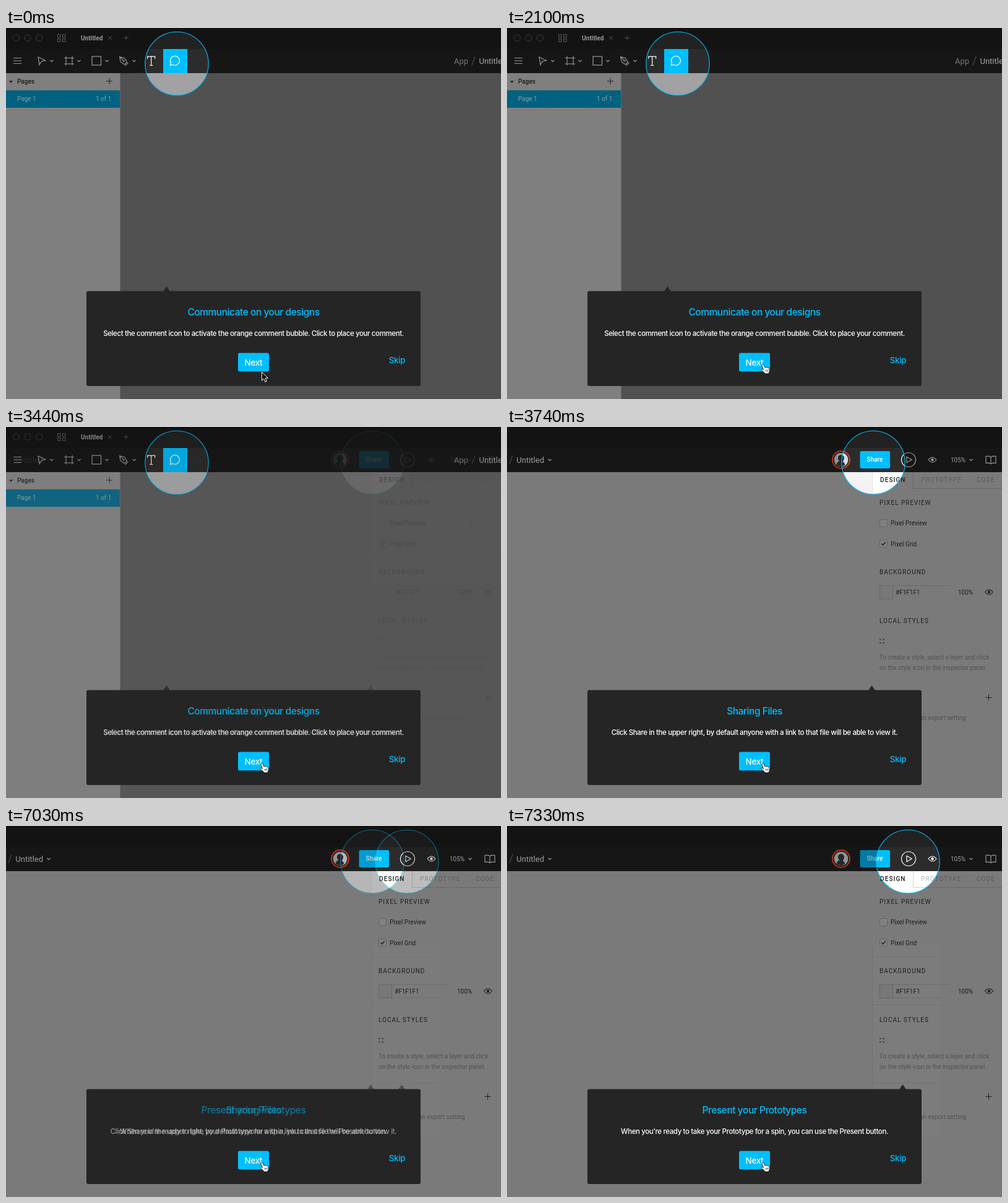
Animation, 800 px wide and 600 px high, one loop 8 s. Source, as an HTML page:

```html
<!DOCTYPE html>
<html lang="en">
<head>
<meta charset="utf-8">
<title>Onboarding tour</title>
<style>
html, body { margin: 0; width: 100%; height: 100%; overflow: hidden; background: #252525; }
svg { display: block; width: 800px; height: 600px; }
text { font: 10px Roboto, sans-serif; white-space: pre; }
.file { font-size: 13px; }
.head { letter-spacing: 1px; }
.tab { letter-spacing: 1.1px; }
.bold { font-weight: 700; }
.mid { font-weight: 500; }
.title, .body, .btn { font: 500 15.5px Inter, sans-serif; letter-spacing: -.46px; text-anchor: middle; }
.body { font-size: 11.5px; letter-spacing: -.39px; }
.btn { font-size: 13.4px; letter-spacing: -.3px; }
</style>
</head>
<body>
<svg id="stage" viewBox="0 0 800 600"></svg>
<script>
const CYAN = '#00bfff', DIALOG = '#252525';

const rect = (x, y, w, h, fill, more = '') =>
  `<rect x="${x}" y="${y}" width="${w}" height="${h}" fill="${fill}" ${more}/>`;
const line = (d, color, width = 1) =>
  `<path d="${d}" fill="none" stroke="${color}" stroke-width="${width}"/>`;
const shape = (d, fill, more = '') => `<path d="${d}" fill="${fill}" ${more}/>`;
const ring = (x, y, r, color, width = 1, fill = 'none') =>
  `<circle cx="${x}" cy="${y}" r="${r}" fill="${fill}" stroke="${color}" stroke-width="${width}"/>`;
const label = (x, y, str, fill, cls = '', more = '') =>
  `<text x="${x}" y="${y}" fill="${fill}" class="${cls}" ${more}>${str}</text>`;
const group = (id, inner) => `<g id="${id}">${inner}</g>`;

const chevron = (x, color) => line(`M${x - 2.6} 51.8l2.6 2.6 2.6-2.6`, color, 1.2);
const plus = (x, y, r, color) => line(`M${x - r} ${y}h${2 * r}M${x} ${y - r}v${2 * r}`, color);
const slash = (x, color) => line(`M${x} 60l5-14`, color);
const eye = (x, y, color) =>
  line(`M${x - 6.5} ${y}q6.5-8 13 0q-6.5 8-13 0z`, color, 1.1) + ring(x, y, 1.8, color, 1, color);
const checkbox = y => rect(602.5, y, 12, 12, '#808080', 'rx="2" stroke="#636363"');
const pointer = x => shape(`M${x - 5.5} 426l5.5-8 5.5 8z`, DIALOG);

const header = lit =>
  rect(0, 0, 800, 34, lit ? '#222' : '#131313') +
  rect(0, 34, 800, 39, lit ? '#2c2c2c' : '#161616') +
  rect(0, 0, 800, 1, '#080808');

// Circle of light over a dimmed screen
const spotlight = (id, x, dim, lit) => `
  <clipPath id="${id}Spot"><circle cx="${x}" cy="57.5" r="51.3"/></clipPath>
  ${dim}<g clip-path="url(#${id}Spot)">${lit}</g>${ring(x, 57.5, 51.2, CYAN, 1.1)}`;

function editorLeft() {
  const ink = '#999', faint = '#4d4d4d';
  const dim = header(false) +
    rect(0, 73, 800, 527, '#515151') +
    rect(0, 73, 184.5, 527, '#7f7f7f') +
    line('M0 100.5h184', '#747474') +
    [16.5, 35, 53.5].map(x => ring(x, 16, 5.2, '#3a3a3a')).join('') +
    [83.5, 91.5].map(x => [10.5, 17.5].map(y =>
      rect(x, y, 4.5, 4.5, 'none', 'stroke="#5c5c5c"')).join('')).join('') +
    label(121, 20, 'Untitled', ink, 'bold') +
    line('M165 13l6 6m0-6l-6 6', faint) + plus(194, 16, 4, faint) +
    line('M12 48.5h13M12 53h13M12 57.5h13', ink, 1.2) +
    line('M52 47L63.5 52.5 57.5 54 54 59.5z', ink, 1.2) +
    line('M97 45.5v15M107 45.5v15M94 48.5h16M94 58h16', ink, 1.1) +
    rect(139, 46, 14.5, 14, 'none', `stroke="${ink}" stroke-width="1.2"`) +
    line('M183.5 46.5l8 2.2 4 6.3-4 4-6.3-4zM184 47l5.5 5.5M197.5 56l-5 5', ink, 1.1) +
    ring(190.3, 53.2, 1.4, ink) +
    [74, 118, 163, 207].map(x => chevron(x, ink)).join('') +
    label(724, 57.5, 'App', '#777', 'file') + slash(753, '#555') +
    label(764.5, 57.5, 'Untitled', '#a8a8a8', 'file') +
    shape('M5 85.5h6l-3 3.5z', '#1a1a1a') +
    label(18, 90, 'Pages', '#1a1a1a', 'mid') + plus(167, 86, 5, '#222') +
    rect(0, 101, 184, 28, '#006180') +
    label(18, 118, 'Page 1', '#8a9ca3') + label(145, 118, '1 of 1', '#8a9ca3');
  const lit = header(true) +
    rect(220, 73, 120, 40, '#a2a2a2') +
    line('M228.7 49.8v-3.6h12v3.6M234.7 46v14.6M232 60.5h5.5', '#fff', 1.2) +
    rect(254, 34, 39, 39, CYAN) +
    line('M265.3 60.5l1.2-4.2a7.4 7.4 0 1 1 3 3z', '#fff', 1.2);
  return spotlight('a', 276, dim, lit) + pointer(259.5);
}

function editorRight(lit) {
  const pick = (off, on) => lit ? on : off;
  const ink = pick('#9c9c9c', '#fff'), dark = '#1e1e1e', soft = pick('#5a5a5a', '#b3b3b3');
  const help = '#525252', edge = '#6c6c6c', box = `stroke="${edge}"`;
  const panel = lit
    ? rect(590, 73, 210, 527, '#fff') + line('M590.5 73v527', '#e2e2e2')
    : `<g class="lines">${rect(590, 73, 210, 527, '#7c7c7c') +
      line('M590.5 73v527M591 211.5h209M591 289.5h209M591 415.5h209', '#727272') +
      rect(752, 145, 37.5, 21, 'none', box) + label(758, 159, '1x', '#686868') +
      line('M779 154.5l2.5 2.5 2.5-2.5', '#686868') +
      rect(602.5, 256.5, 115, 21.5, 'none', box) +
      rect(723.5, 256.5, 38.5, 21.5, 'none', box)}</g>`;
  return header(lit) +
    rect(0, 73, 800, 527, pick('#7a7a7a', '#f3f3f3')) + panel +
    line('M656.5 73v26.5H800', pick('#686868', '#d2d2d2')) +
    slash(4, '#555') + label(15.3, 57.5, 'Untitled', ink, 'file') + chevron(69, ink) +
    ring(540, 53, 14, pick('#b5331b', '#d63c1f'), 2) +
    ring(540, 53, 11.3, 'none', 0, pick('#909496', '#d5dde2')) +
    shape('M532.5 61.2q.5-5 5-5.7-3.2-3-2.5-7 1.5-3.5 5.5-3.5 4.5 1 4.5 5.5-.5 4-2.5 5.5 3.5 1.5 3.5 5.5-6 5-13.5-.3z', '#25282a') +
    rect(570.5, 39, 48.5, 28, pick('#007ba4', CYAN), 'rx="2"') +
    label(594.5, 56, 'Share', pick('#9cb4bd', '#fff'), 'mid', 'text-anchor="middle"') +
    ring(649, 53, 11.5, ink, 1.2) + line('M646 48.2v9.6l8.2-4.8z', ink, 1.2) +
    eye(687.5, 53, ink) +
    label(717, 56.7, '105%', ink) + chevron(750, ink) +
    line('M782 48.5q-4-2-8-1v11q4-1 8 1q4-2 8-1v-11q-4-1-8 1v11', ink, 1.1) +
    label(603, 89, 'DESIGN', dark, 'tab mid') +
    label(669, 89, 'PROTOTYPE', soft, 'tab') + label(759, 89, 'CODE', soft, 'tab') +
    label(602, 126, 'PIXEL PREVIEW', dark, 'head') +
    checkbox(149.5) + label(620, 159, 'Pixel Preview', dark) +
    checkbox(182.5) + label(620, 192.5, 'Pixel Grid', dark) +
    line('M605.5 188.5l2.2 2.4 4-4.6', dark, 1.5) +
    label(602, 238, 'BACKGROUND', dark, 'head') +
    rect(602.5, 256.5, 21, 21.5, '#787878', 'stroke="#666"') + line('M624 256.5h92', edge) +
    label(628, 271, '#F1F1F1', dark) + label(729, 271, '100%', dark) + eye(779, 267, dark) +
    label(602, 316.5, 'LOCAL STYLES', dark, 'head') +
    [602, 607.5].map(x => [342.5, 348].map(y => rect(x, y, 2.4, 2.4, '#444')).join('')).join('') +
    label(602, 376, 'To create a style, select a layer and click', help) +
    label(602, 392.5, 'on the style icon in the inspector panel.', help) +
    plus(778.5, 437.5, 5, dark) +
    label(742, 474, 'an export setting', help, '', 'text-anchor="end"');
}

const shareTour = (id, x, tip) =>
  spotlight(id, x, editorRight(false), editorRight(true)) + pointer(tip);

const message = (id, title, body) =>
  group(id, label(400, 464.5, title, CYAN, 'title') + label(400, 497.5, body, '#fff', 'body'));

const stage = document.getElementById('stage');
stage.innerHTML =
  group('share', shareTour('b', 592, 589.5)) +
  group('present', shareTour('c', 648, 639.5)) +
  group('comment', editorLeft()) +
  rect(130, 425.5, 540, 153.5, DIALOG, 'rx="3"') +
  message('commentText', 'Communicate on your designs',
    'Select the comment icon to activate the orange comment bubble. Click to place your comment.') +
  message('shareText', 'Sharing Files',
    'Click Share in the upper right, by default anyone with a link to that file will be able to view it.') +
  message('presentText', 'Present your Prototypes',
    "When you're ready to take your Prototype for a spin, you can use the Present button.") +
  rect(375, 525.5, 50, 30, CYAN, 'rx="2.5"') +
  label(400, 545.5, 'Next', '#fff', 'btn') + label(632, 541.8, 'Skip', CYAN, 'btn') +
  group('arrow', shape('M.5.5V14l3.2-3 2.2 5.3 2.3-1-2.2-5.2h4.3z', '#000', 'stroke="#fff"')) +
  group('hand',
    shape('M3 1.5Q4.5.2 5.6 1.8L7.4 6.2Q8.6 5 9.6 6.2 11 5.2 12 6.6 13.6 6 14.3 7.8L15 11Q15 13.2 13.6 14.6V16H7.6Q6 13.5 2.4 11 .6 9 2.4 8.4 3.6 8.4 5 9.8L2.6 3.4Q2.4 2.2 3 1.5z',
      '#fff', 'stroke="#000" stroke-width=".8"') +
    line('M8.5 10l.8 3M10.5 9.7l.7 3M12.4 9.3l.5 3', '#222', .8)) +
  '<clipPath id="strip"><rect x="590" y="190" width="110" height="310"/></clipPath>';

const el = id => document.getElementById(id);
const shareLines = document.querySelector('#share .lines');
document.querySelector('#present .lines').setAttribute('clip-path', 'url(#strip)');

// Each track is a list of [start time, held value]
const tracks = {
  arrowY: [[0, 556], [600, 551], [750, 548], [900, 546], [1800, 545]],
  handY: [[0, 545], [2100, 543]],
  hand: [[0, 0], [1950, .6], [2100, 1]],
  comment: [[0, 1], [3440, .86], [3590, .25], [3740, 0]],
  present: [[0, 0], [7030, .5], [7180, .93], [7330, 1]],
  lines: [[0, 1], [3740, 0]]
};
const at = (name, t) => tracks[name].filter(([start]) => start <= t).pop()[1];
const fade = (node, value) => node.setAttribute('opacity', value);
const move = (id, x, y) => el(id).setAttribute('transform', `translate(${x} ${y})`);

const begin = performance.now();
function draw(now) {
  const t = Math.max(0, now - begin) % 8000;
  const comment = at('comment', t), present = at('present', t), hand = at('hand', t);
  fade(el('comment'), comment);
  fade(el('commentText'), comment);
  fade(el('present'), present);
  fade(el('presentText'), present);
  fade(el('shareText'), (1 - comment) * (1 - present));
  fade(shareLines, at('lines', t));
  fade(el('arrow'), 1 - hand);
  fade(el('hand'), hand);
  move('arrow', 413, at('arrowY', t));
  move('hand', 409.5, at('handY', t));
  requestAnimationFrame(draw);
}
draw(begin);
</script>
</body>
</html>
```
